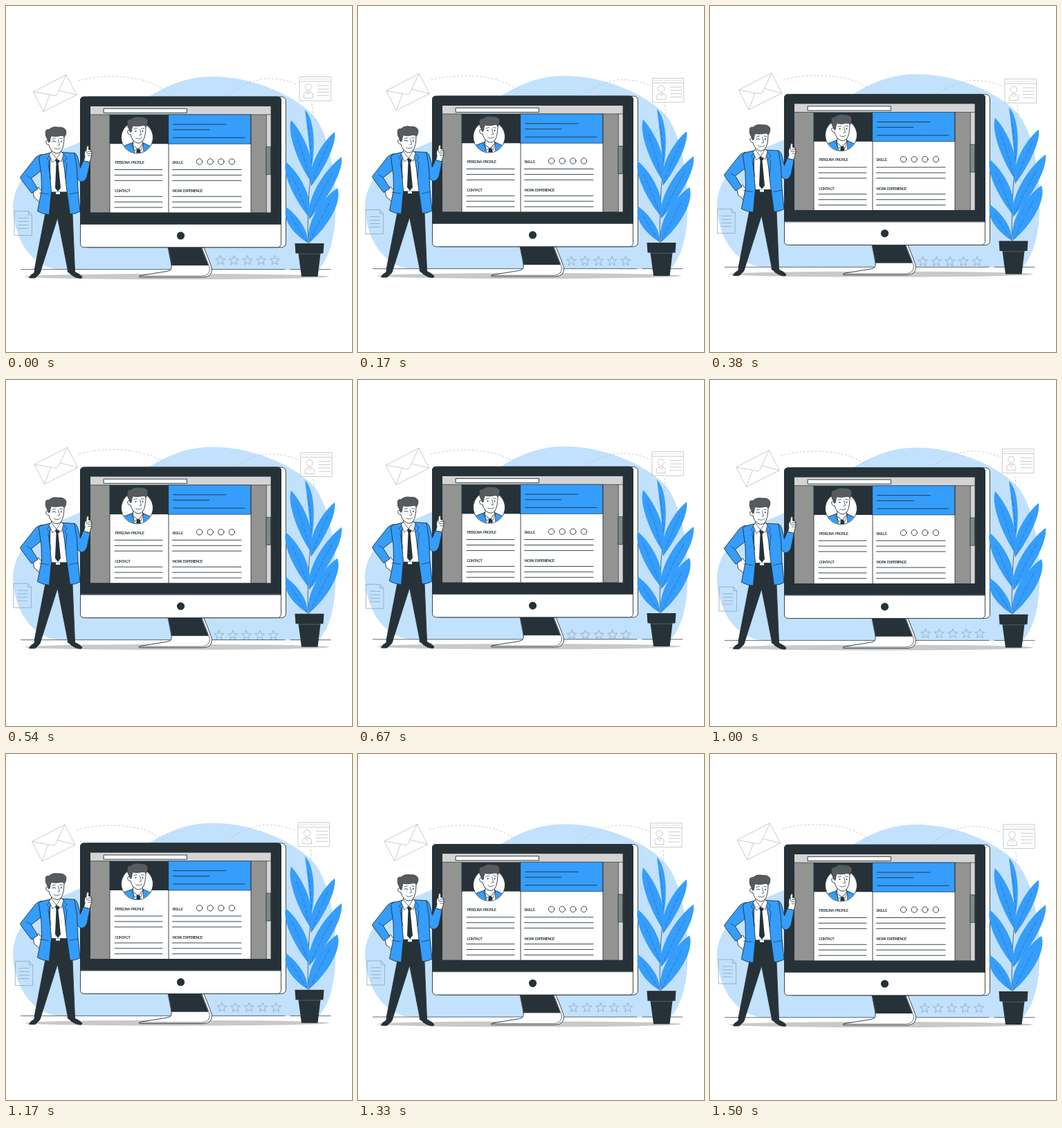
Recreate the animation shown at these times as an HTML page. Size 500 px wide and 500 px high, loop 1.54 s.

```html
<!DOCTYPE html>
<html lang="en">
<head>
<meta charset="utf-8">
<title>Persona profile</title>
<style>
  html, body { margin: 0; width: 100%; height: 100%; overflow: hidden; background: #fff; }
  svg { display: block; width: 100vw; height: 100vh; }
  .ink { stroke: #263238; stroke-width: .9; stroke-linejoin: round; stroke-linecap: round; }
  .thin { stroke-width: .7; }
  .dark { fill: #263238; }
  .blue { fill: #359dfc; }
  .white { fill: #fff; }
  .none { fill: none; }
  .hair { fill: #575b5d; }
  .pale { fill: none; stroke: #b4b6b8; stroke-width: .7; stroke-linejoin: round; }
  .soft { fill: none; stroke: #8fa6bb; stroke-width: .8; stroke-linejoin: round; }
  .dash { fill: none; stroke: #b9bec3; stroke-width: .8; stroke-dasharray: 3 2.5; }
  .vein { fill: none; stroke: #1f5c96; stroke-width: .5; stroke-dasharray: 7 2.5; }
  text { font: 5.9px Roboto, Arial, sans-serif; letter-spacing: -.6px; word-spacing: .5px; fill: #263238; stroke: #263238; stroke-width: .1; }
</style>
</head>
<body>
<svg viewBox="0 0 500 500" xmlns="http://www.w3.org/2000/svg">
  <defs>
    <clipPath id="round"><circle cx="189.5" cy="190" r="22.6"/></clipPath>
    <g id="head">
      <path class="white ink" d="M66 206 L65.500 216 L73 222 L79.500 214 L79 207Z"/>
      <path class="white ink" d="M60.500 187 L61 195 Q57.500 193 57.800 197 Q58.500 201 62 200.500 Q64 209 70 212 Q75 214.500 79.500 210 Q84 204 84 188 L75 182Z"/>
      <path class="hair ink thin" d="M61.500 197 L60.500 194 Q56.500 188 57.300 183 Q56.500 178 62.500 178.500 Q67 173.500 76 175.300 Q84 174.500 86.800 180 Q87.800 185 84.300 189.500 Q82.500 186.500 79 187.500 Q70 189.500 65.500 187.500 Q63.500 191 63.500 196Z"/>
      <path class="none ink thin" d="M75.500 193 L77.500 201 L74.800 201.300 M69.500 205.500 Q74 208.500 78.500 205 M67 192.500 L71.500 191.300 M77.500 191.300 L81.500 192"/>
    </g>
  </defs>

  <g class="main">
    <path fill="#c2e1fd" d="M10 291 C11 252 40 224 92 203 C142 184 169 151 210 129 C236 113 265 102 298 102 C352 102 412 125 444 158 C467 184 479 250 476 305 C474 340 466 365 452 381 L82 381 C44 381 12 346 10 291Z"/>
  </g>

  <g id="mailPath">
    <path class="dash" d="M104 108 Q150 96 198 107 Q225 115 245 137"/>
  </g>
  <g id="cardPath">
    <path class="dash" d="M319 131 Q342 110 375 105 Q400 104 422 114"/>
    <path class="dash" d="M442 141 Q450 172 403 201"/>
  </g>

  <g class="main">
    <ellipse cx="247" cy="391" rx="220" ry="4" fill="#c9c9c9"/>
    <path class="ink thin none" d="M21.500 380.700H403 M411 380.700H469"/>
  </g>

  <g id="mail">
    <path class="pale" style="fill:#fff" d="M39.500 124 L87 99.500 L102 128.500 L54 152.500Z"/>
    <path class="pale" d="M39.500 124 L70 129.500 Q72.500 130 73.700 127.500 L87 99.500 M54 152.500 L63 128.500 M102 128.500 L77 122"/>
  </g>

  <g id="card">
    <path class="pale" d="M424 102.300H469.500V137H424Z M424 109H469.500 M450 115H467 M450 120H467 M450 124.500H467 M450 129.500H467"/>
    <path class="pale" stroke-dasharray="1.500 1" d="M426 105.500H467"/>
    <circle class="pale" cx="437" cy="117.500" r="4.700"/>
    <path class="pale" d="M430.500 133 V128 Q431 124 437 124 Q443 124 443.500 128 V133Z M434 124.500 L437 128 L440 124.500"/>
  </g>

  <g id="sheet">
    <path class="soft" d="M12 296.500H32.500L37.500 302V331.500H12Z M32.500 296.500V302H37.500 M17.500 306.500H32.500 M17.500 311.500H32.500 M17.500 316.500H32.500 M17.500 321.500H32.500"/>
  </g>
  <g id="stars"></g>

  <g class="main">
    <!-- stand -->
    <path class="white ink" d="M239 374 V379 Q238.500 383 229 384 L195 389.500 Q190.500 391 193 392 H285 Q298 391.500 297.500 380 Q297 376 286 349 H278Z"/>
    <path class="none ink thin" d="M193 390.300 H283 Q294 390 294.500 380 Q294 376 283 349"/>
    <path class="dark ink" d="M234.500 349 H282 L292 374.500 H239.500Z"/>

    <!-- monitor -->
    <rect class="white ink" x="113" y="131.300" width="291.500" height="217.500" rx="6"/>
    <rect class="white ink" x="107.500" y="131.300" width="290" height="217.500" rx="5"/>
    <path class="dark ink" d="M107.500 315 V136.300 Q107.500 131.300 112.500 131.300 H392.500 Q397.500 131.300 397.500 136.300 V315Z"/>
    <circle class="dark" cx="252.500" cy="332" r="5.600"/>

    <rect x="122" y="145" width="260.500" height="153.300" fill="#939492"/>
    <path fill="#d4d4d4" d="M122 145H382.500V298.300H376.300V157H122Z"/>
    <path class="none ink thin" d="M122 157H382.500 M376.300 157V298"/>
    <rect class="ink thin" x="376.300" y="203.500" width="6.200" height="40" fill="#858786"/>
    <rect class="white ink" x="141.500" y="148.300" width="120" height="6.200"/>

    <rect class="white" x="150" y="157" width="204" height="141.300"/>
    <rect class="dark" x="150" y="157" width="85" height="42.300"/>
    <rect class="blue ink thin" x="235" y="157" width="118.700" height="42.300"/>
    <path class="none ink" d="M150 157V298.200 M354 157V298.200 M235 199V298.200"/>
    <path class="none ink" d="M241.500 171H318 M241.500 178.800H294 M241.500 190.300H345"/>
    <g id="rows"></g>

    <text x="157.200" y="227.900">PERSONA PROFILE</text>
    <text x="157.200" y="269.400">CONTACT</text>
    <text x="240.200" y="227.900">SKILLS</text>
    <text x="240.200" y="269.400">WORK EXPERIENCE</text>

    <!-- portrait -->
    <circle class="white ink" cx="189.500" cy="190" r="23"/>
    <g clip-path="url(#round)">
      <path class="blue ink" d="M164 216 L171 202 L183 197.500 L199 198 L209 203 L215 216Z"/>
      <path class="white ink thin" d="M183 197.500 L186 215 H199 L198 198 L191 206Z"/>
      <path class="dark" d="M189 206.500 L192 205.500 L194 209 L195 214 H188Z"/>
    </g>
    <use href="#head" x="118" y="-14.700"/>
    <path class="none ink thin" d="M181 200 L186 209 L191 206 L195 209 L198.500 199"/>
    <circle class="dark" cx="187.500" cy="181" r="1"/>
    <circle class="dark" cx="197.500" cy="181" r="1"/>

    <!-- plant -->
    <path class="none ink thin" d="M437 344 Q434 300 441 235"/>
    <g id="leaves"></g>
    <path class="dark" d="M417.500 343H459.500L458.500 357.500H454.500L450.500 391H427L422.500 357.500H418.500Z"/>
    <path d="M422 358.300H455" stroke="#63727a" stroke-width=".7"/>

    <!-- man -->
    <path class="dark ink" d="M33.500 392.500 Q35 388.500 40.500 386 L42 381 L50 383 L48.500 387 L42 393 H35Z M89 383 L98.500 382 L100.500 385 Q107 387.500 110 391.500 Q110 393.500 107 393.500 Q100 393 94.500 388.500Z"/>
    <path class="dark ink" d="M64 270 H89 L96 300 L99.500 383.500 L90 385 L74.500 306 L49.500 384.500 L41 382 L57 299Z"/>
    <path class="white ink" d="M64 215 L82 213 L90 268 L89 272 H64Z"/>
    <path class="dark" d="M64 268.500H89V272.500H64Z"/>
    <rect class="white" x="72" y="268.800" width="6" height="3.200"/>
    <path class="white ink" d="M39 266 L47 262 L52 268 L50.500 274 L51 281 Q48 285 46 281 L41 277Z"/>
    <path class="blue ink" d="M52 214.500 Q45 216 42 220 L20.500 247.500 Q21 250 37 270.500 L46 264.500 L36.500 249 L52 237Z"/>
    <path class="none ink thin" d="M36.500 249 L30 245"/>
    <path class="blue ink" d="M99 212.500 Q102.500 214 104 220 L107.500 234 L112 222.500 L121.500 225.500 L117 247 Q114 254 109 254 Q103 253 99 240Z"/>
    <path class="white ink" d="M112.500 223.500 L114 218 Q112.500 210 116 208 Q115.800 202 118.300 201.700 Q120.300 203 119.500 207.500 L123 208.500 Q125.200 213 123 219 L121 225.500Z"/>
    <path class="none ink thin" d="M118.500 210.500H124 M118.500 213.500H124 M118.500 216.500H123.500 M116 208 Q116 213 118.500 214"/>
    <path class="blue ink" d="M65 212 L50 215.500 L47.500 219 L51 245 L51.500 266 L45.500 296.500 Q53 301 62.500 301.500 L65.500 268 L62.500 234Z"/>
    <path class="blue ink" d="M80.500 211.500 L99 212.500 L102.500 235 L104 268 L107 297 Q100 301 92.500 300.500 L87.500 264 L84.500 236Z"/>
    <path class="none ink thin" d="M65 212 L59.500 221 L62.500 224 L61 228 L65 250 M80.500 211.500 L88 220 L84.500 224 L88 228 L86 250 M48.500 270 L61.500 272 M92 272 L104 269.500"/>
    <path class="dark" d="M70.500 221 L75.500 220 L77.500 225 L75.500 227 L79 263 L75 268 L71 263 L72.500 227Z"/>
    <use href="#head"/>
    <path class="white ink thin" d="M65.500 211 L73 221 L67 226 L62.500 215Z M79.500 210.500 L73 221 L80 225 L83 214Z"/>
    <path class="none ink" d="M67 196 Q69.500 194 72 196.300"/>
    <circle class="dark" cx="79.800" cy="195.700" r="1"/>
  </g>
</svg>

<script>
  const LOOP = 1540;
  const $ = id => document.getElementById(id);
  const path = (cls, d) => `<path class="${cls}" d="${d}"/>`;

  function star(cx, cy, r) {
    let d = "";
    for (let i = 0; i < 10; i++) {
      const a = i * Math.PI / 5 - Math.PI / 2, k = i % 2 ? r * .43 : r;
      d += (i ? "L" : "M") + (cx + k * Math.cos(a)).toFixed(2) + " " + (cy + k * Math.sin(a)).toFixed(2);
    }
    return path("soft", d + "Z");
  }

  // Curved leaf from base to tip: the outer edge is fullest near the tip,
  // the inner edge near the base. Positive widths lie right of the axis.
  function leaf([bx, by, tx, ty, outer, inner]) {
    const dx = tx - bx, dy = ty - by, len = Math.hypot(dx, dy);
    const at = (k, w) => `${(bx + dx * k - dy / len * w).toFixed(1)} ${(by + dy * k + dx / len * w).toFixed(1)}`;
    const mid = (outer + inner) * .35;
    return path("blue", `M${at(0, 0)}C${at(.25, outer * .6)} ${at(.8, outer * 1.1)} ${at(1, 0)}C${at(.75, inner * .65)} ${at(.25, inner)} ${at(0, 0)}Z`) +
      path("vein", `M${at(0, 0)}Q${at(.4, mid)} ${at(.75, mid * .4)}`);
  }

  $("stars").innerHTML = [0, 1, 2, 3, 4].map(i => star(309.8 + i * 19.6, 367.8, 7.3)).join("");

  $("leaves").innerHTML = [
    [441, 236, 432, 150, 13, 1],
    [440, 253, 412, 165, -12, 17],
    [441, 260, 475, 182, 10, -17],
    [437, 304, 404, 225, -12, 18],
    [438, 308, 485, 218, 13, -19],
    [436, 342, 405, 291, -15, 11],
    [438, 342, 479, 263, 17, -19]
  ].map(leaf).join("");

  $("rows").innerHTML =
    [236.5, 244.4, 252.3, 275.3, 283.2, 291.1].map(y => path("none ink", `M157 ${y}H226M240.500 ${y}H340`)).join("") +
    [0, 1, 2, 3].map(i => `<circle class="none ink" cx="${279.6 + i * 15.6}" cy="225" r="4.200"/>`).join("");

  const main = document.querySelectorAll(".main");
  const drift = [
    ["mail", 2, -2.6], ["mailPath", 2, -1.5],
    ["card", 2, 3.2], ["cardPath", 2, 2.6],
    ["sheet", -1.3, -3.1], ["stars", -2.2, 1.4]
  ].map(([id, x, y]) => [$(id), x, y]);

  const move = (el, x, y) => el.setAttribute("transform", `translate(${x.toFixed(3)} ${y.toFixed(3)})`);

  function draw(ms) {
    const a = (ms % LOOP) / LOOP * 2 * Math.PI;
    const lift = 3 * Math.cos(a + .16) - 3, s = Math.sin(a);
    main.forEach(el => move(el, 0, lift));
    drift.forEach(([el, x, y]) => move(el, x * s, y * s));
  }

  const start = performance.now();
  function tick() {
    draw(performance.now() - start);
    requestAnimationFrame(tick);
  }
  tick();
</script>
</body>
</html>
```
